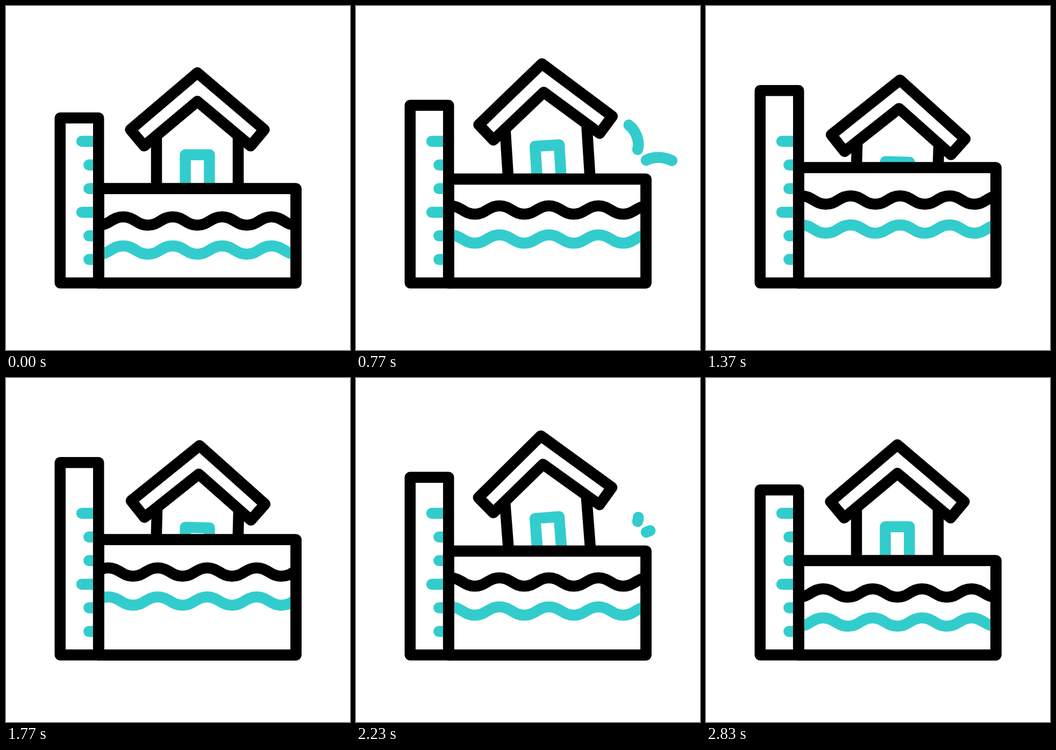
Animation of 640x640 px, one loop 3 s. Source, as an HTML page:

```html
<!DOCTYPE html>
<html>
<head>
<meta charset="utf-8">
<title>Flood level</title>
<style>
  html, body { margin: 0; height: 100%; overflow: hidden; background: #fff; font-family: sans-serif; }
  svg { display: block; width: 100%; height: 100%; }
  path { fill: none; stroke: #000; stroke-width: 20.5; stroke-linecap: round; stroke-linejoin: round; }
  .teal { stroke: #33cccc; }
  .solid { fill: #fff; }
</style>
</head>
<body>
<svg viewBox="0 0 640 640">
  <clipPath id="basin"><rect x="172" width="368" height="640"/></clipPath>
  <g id="house">
    <path d="M280 242V350M432 242V350"/>
    <path class="teal" d="M333.6 350V276.8H378.4V350"/>
    <path class="solid" d="M356 124.3L480.5 230L455 260.3L356 177.3L257 260.3L231.5 230Z"/>
  </g>
  <path id="water" class="solid"/>
  <g clip-path="url(#basin)">
    <g id="waves">
      <path class="wave"/>
      <path class="wave teal" transform="translate(0 54)"/>
    </g>
  </g>
  <path id="waterEdge"/>
  <path class="teal" d="M141 251.7H172M154.3 295.8H172M154.3 339.8H172M141 383.7H172M154.3 427.6H172M154.3 471.5H172"/>
  <path id="ruler"/>
  <path class="splash teal" pathLength="1" d="M524 267C528 253 522 232 507 221"/>
  <path class="splash teal" pathLength="1" d="M540 287C553 280 572 280 588.5 288"/>
</svg>
<script>
const LOOP = 3000, FPS = 30;
const $ = id => document.getElementById(id);
const clamp = x => Math.min(1, Math.max(0, x));
const smooth = x => x * x * (3 - 2 * x);
const ramp = (n, from, to) => smooth(clamp((n - from) / (to - from)));

// Keys are [frame, value] pairs, eased in and out between neighbours.
const track = (n, keys) => keys.slice(1).reduce(
  (value, [frame, next], i) => value + (next - keys[i][1]) * ramp(n, keys[i][0], frame), keys[0][1]);

const SWAY = [[10, 0], [30, -5], [47, 4.4], [63.2, -5], [80, 0]];
const BOB = [[10, 0], [27.5, -20.5], [45, 18.5], [62.5, -20.5], [80, 0]];
const DRIFT = [[10, 0], [45, -138], [80, 0]];

const waveShape = 'M126 392.2' + 'c20 0 26 15.6 46 15.6s26 -15.6 46 -15.6'.repeat(7);
document.querySelectorAll('.wave').forEach(wave => wave.setAttribute('d', waveShape));
const splashes = document.querySelectorAll('.splash');

const box = (left, top, right) => `M${left} ${top}H${right}V515.2H${left}Z`;

function draw(n) {
  const rise = clamp(Math.min(n - 10, 80 - n) / 27.5);
  const level = smooth(rise);
  const waveLevel = level + 0.5 * rise * (1 - rise) ** 2;

  const surface = box(172.2, 339.8 - 39 * level, 539.5);
  $('water').setAttribute('d', surface);
  $('waterEdge').setAttribute('d', surface);
  $('ruler').setAttribute('d', box(100.7, 208.2 - 51 * level, 172.2));
  $('waves').setAttribute('transform', `translate(${track(n, DRIFT)} ${-39 * waveLevel})`);
  $('house').setAttribute('transform', `translate(0 ${track(n, BOB)}) rotate(${track(n, SWAY)} 356 284)`);

  const [tail, head] = n < 50
    ? [ramp(n, 25, 38), ramp(n, 11, 24)]
    : [ramp(n, 75, 85), ramp(n, 64, 76)];
  for (const { style } of splashes) {
    style.visibility = head - tail > 0.001 ? 'visible' : 'hidden';
    style.strokeDasharray = `${head - tail} 2`;
    style.strokeDashoffset = -tail;
  }
}

function tick() {
  const time = performance.now() % LOOP;
  draw(Math.floor((time + 4) * FPS / 1000));
  requestAnimationFrame(tick);
}
tick();
</script>
</body>
</html>
```
